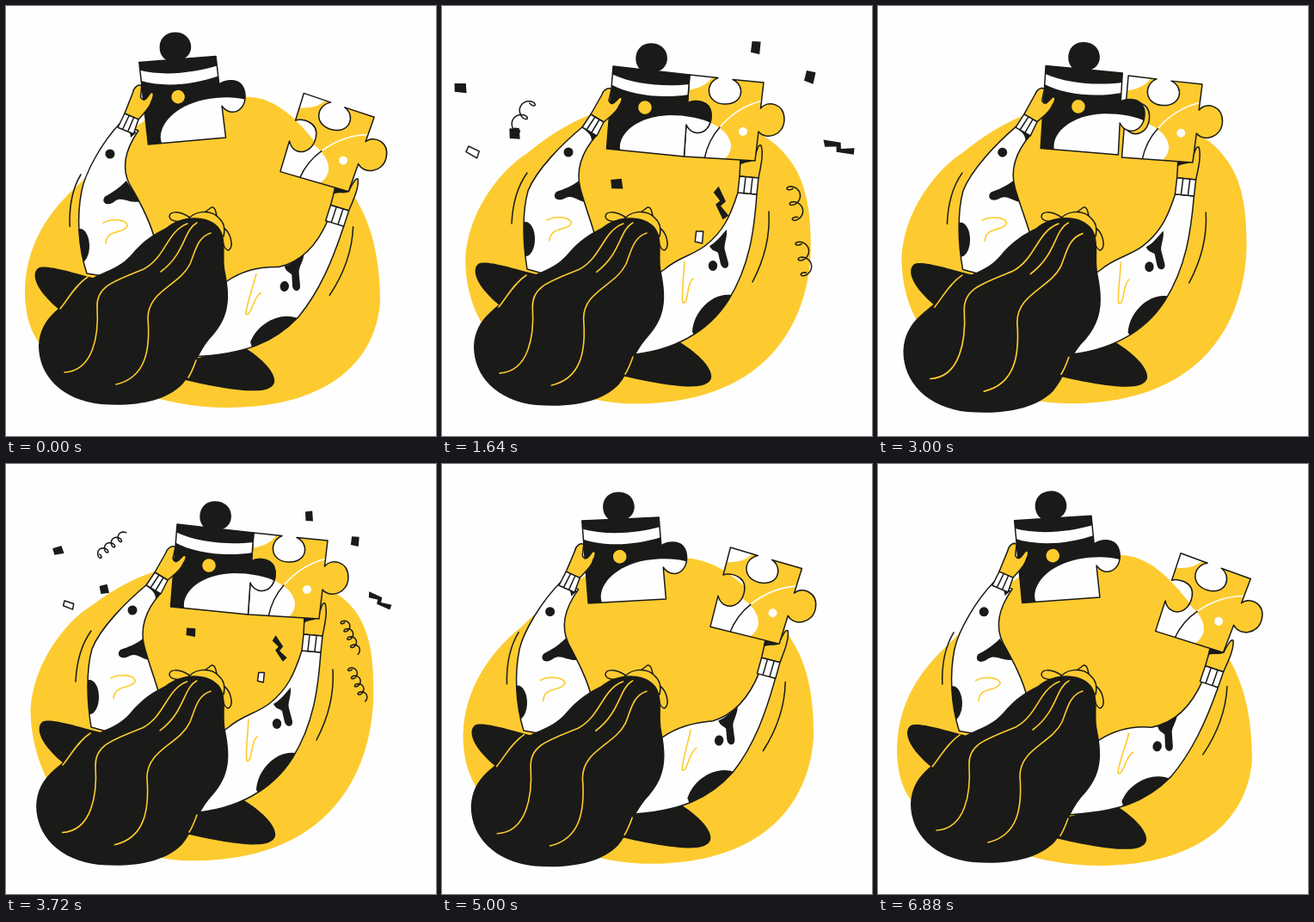
Write an HTML page that moves like this. It is 500x500 px and loops after 6.92 s.

```html
<!DOCTYPE html>
<html lang="en">
<head>
<meta charset="utf-8">
<title>Puzzle</title>
<style>
html, body { margin: 0; width: 100%; height: 100%; overflow: hidden; background: #fefefe; }
svg { display: block; width: 100vw; height: 100vh; }
path { fill: none; stroke-linecap: round; stroke-linejoin: round; }
.ink { fill: #1a1a18; }
.sun { fill: #fdcb2f; }
.paper { fill: #fefefe; }
.line { stroke: #1a1a18; stroke-width: 1.5; }
.glow { stroke: #fdcb2f; stroke-width: 1.6; }
.chalk { stroke: #fefefe; stroke-width: 1.6; }
</style>
</head>
<body>
<svg id="stage" viewBox="0 0 500 500"></svg>
<script>
const LOOP = 6920, CYCLE = LOOP / 3, TAU = 2 * Math.PI;
const NS = 'http://www.w3.org/2000/svg';
const stage = document.getElementById('stage');

function add(parent, tag, attrs = {}) {
  const el = document.createElementNS(NS, tag);
  for (const name in attrs) el.setAttribute(name, attrs[name]);
  return parent.appendChild(el);
}
const group = parent => add(parent, 'g');
const draw = (parent, cls, d) => add(parent, 'path', { class: cls, d });
const dot = (x, y, rx, ry = rx) =>
  `M${x - rx},${y} a${rx},${ry} 0 1,0 ${2 * rx},0 a${rx},${ry} 0 1,0 ${-2 * rx},0Z`;
const lerp = (a, b, k) => a + (b - a) * k;
const smooth = (from, to, t) => {
  const s = Math.min(1, Math.max(0, (t - from) / (to - from)));
  return s * s * (3 - 2 * s);
};

// How far each part is opened: 0 joined, 1 apart, with a sway while apart
const wave = (t, peak, period) => Math.cos(TAU * (t - peak) / period);
const apart = (t, leave) => 1 - smooth(leave, 760, t) + smooth(1750, 2220, t);
function pose(t) {
  const s = t > 1500 ? t - CYCLE : t;
  return {
    left: apart(t, 380) * (1 + .18 * wave(s, 125, 500)),
    right: apart(t, 300) * (1 + .14 * wave(s, 250, 340)),
    blob: (.5 + .5 * wave(t, 0, CYCLE)) ** 1.5
  };
}
const swell = t => 1 + .044 * Math.sin(Math.PI * (t / CYCLE) ** .65) ** 4;

// Blends the numbers of two paths built from the same commands
const NUM = /-?\d+(\.\d+)?/g;
function mix(shut, open, k) {
  const to = open.match(NUM);
  let i = 0;
  return shut.replace(NUM, n => +lerp(+n, +to[i++], k).toFixed(2));
}
const morphs = [], glides = [];
function morph(parent, side, cls, shut, open) {
  morphs.push({ el: draw(parent, cls, shut), side, shut, open });
}
// A rigid part that shifts and turns about a point as its side opens
function glide(parent, side, dx, dy, turn = 0, x = 0, y = 0) {
  const el = group(parent);
  glides.push({ el, side, dx, dy, turn, x, y });
  return el;
}

// Background shape, motion lines, dark shapes behind the body
const back = group(stage);
morph(back, 'blob', 'sun',
  'M29,290 C28,235 70,180 100,163 C120,148 140,137 160,129 C200,115 240,115 285,116 C325,120 350,130 370,143 C390,150 400,160 407,170 C425,195 427,230 427,262 C427,340 390,461 215,461 C150,461 100,430 65,395 C40,360 30,320 29,290Z',
  'M22,330 C24,265 62,228 88,204 C105,186 120,165 140,150 C180,112 235,102 286,106 C320,109 345,140 365,165 C382,186 398,208 409,228 C428,262 435,300 435,345 C430,405 385,467 255,467 C200,467 150,450 100,430 C40,410 22,380 22,330Z');
draw(glide(back, 'left', -12, 2, -5, 99, 194), 'line', 'M99,194 C86,212 82,232 81,253');
draw(glide(back, 'right', 24, 18, 6, 380, 239), 'line', 'M380,239 C382,270 372,300 361,321');
draw(glide(back, 'left', -5, 5), 'ink', 'M110,312 C75,303 50,295 42,300 C33,308 42,328 68,349 L100,350Z');
draw(glide(back, 'right', -1, 5), 'ink', 'M215,407 L275,390 C300,405 315,422 313,433 C308,448 270,444 205,429Z');

// A sleeve outline; returns a group for marks clipped to it
function sleeve(id, side, shut, open) {
  const g = group(stage);
  morph(add(g, 'clipPath', { id }), side, '', shut, open);
  morph(g, side, 'paper', shut, open);
  const marks = add(g, 'g', { 'clip-path': `url(#${id})` });
  morph(g, side, 'line', shut, open);
  return marks;
}

const armL = sleeve('armL', 'left',
  'M164,140 C140,160 110,190 100,215 C93,240 94,275 99,306 L150,320 L190,290 L178,268 C175,255 168,238 161,213 C155,190 162,170 180,150Z',
  'M133,136 C110,160 92,195 88,215 C82,245 84,280 94,311 L150,320 L190,290 L174,275 C168,250 156,228 144,208 C133,187 140,165 154,145Z');
draw(glide(armL, 'left', -26, 2), 'ink', dot(147, 170, 5.5));
draw(glide(armL, 'left', -11, 8), 'ink', dot(97, 271, 11, 20));
draw(glide(armL, 'left', -21, 1, -10, 161, 202), 'ink',
  'M161,202 C150,210 142,213 133,216 C127,222 134,229 144,223 C153,219 158,228 172,229Z');
draw(glide(armL, 'left', -29, -4), 'ink', 'M163,141 L181,151 L174,157 C174,149 169,147 163,141Z');
draw(glide(armL, 'left', -9, 3), 'glow', 'M122,249 C133,243 152,246 150,253 C146,262 126,256 125,273');

const armR = sleeve('armR', 'right',
  'M225,330 L259,306 C275,292 292,290 307,278 C327,262 335,245 344,217 L366,219 C363,260 358,302 333,342 C310,378 270,402 215,406Z',
  'M225,340 L257,320 C275,308 295,303 317,304 C345,298 363,277 375,249 L393,257 C380,296 365,332 340,362 C312,391 280,405 215,408Z');
const drip = glide(armR, 'right', 13, 24, 10, 311, 279);
draw(drip, 'ink',
  'M311,279 C319,275 326,265 331,260 C332,270 327,278 329,284 L333,299 C334,306 326,307 324,300 L321,287 C317,284 314,285 311,279Z');
draw(drip, 'ink', dot(315, 302, 5.2, 6));
draw(glide(armR, 'right', -7, 12, 18, 291, 379), 'ink', 'M291,379 C292,355 315,333 336,336 L345,360 L300,392Z');
draw(glide(armR, 'right', 9, 15, 12, 282, 297), 'glow', 'M282,297 C281,318 278,338 280,345 C287,347 284,322 292,317');

const handR = glide(stage, 'right', 32, 34, 12, 346, 198);
draw(handR, 'sun line', 'M346,198 L347,179 L363,178 C366,168 368,160 371,162 C374,172 371,185 368,200Z');
draw(handR, 'paper line', 'M346,198 L368,200 L366,219 L344,217Z M353,199 L351,217 M361,200 L359,218');
draw(handR, 'ink', 'M346,177 L365,177 C360,183 354,180 346,185Z');

// Confetti bursts outwards from one centre, streamers also fall
const BOLT = 'M-.7,-.5 L.1,-.2 L.05,.1 L.7,.2 L.6,.5 L-.2,.2 L-.15,-.05 L-.7,-.15Z';
const CHIP = 'M-.5,-.42 L.4,-.5 L.5,.5 L-.45,.45Z';
const BURST = [282, 131];
const kinds = {
  chip: { cls: 'ink', d: CHIP, size: 8, at: [[100, 106], [144, 143], [340, 73], [384, 97], [227, 184]] },
  card: { cls: 'paper line', d: CHIP, size: 7, at: [[110, 158], [294, 227]] },
  bolt: { cls: 'ink', d: BOLT, size: 15, at: [[408, 154], [312, 200]] },
  curl: { cls: 'line', at: [[150, 62], [389, 170], [396, 215]] }
};
let seed = 7;
const random = () => (seed = seed * 16807 % 2147483647) / 2147483647;
const party = group(stage);
const bits = Object.values(kinds).flatMap(({ cls, d, size, at }) => at.map(([x, y]) => {
  const el = draw(party, cls, d || '');
  if (d) el.setAttribute('vector-effect', 'non-scaling-stroke');
  return { el, x, y, size, turn: random() * 60 - 30, spin: random() * 80 - 40, thin: .7 + .6 * random() };
}));

function curl(len, u) {
  const turns = 5.5 - 3 * u, amp = 2 + 5 * u;
  let d = '';
  for (let i = 0; i <= 60; i++) {
    const s = i / 60, a = TAU * turns * s;
    const x = len * (s - .5) + amp * .8 * Math.cos(a), y = amp * Math.sin(a);
    d += `${i ? 'L' : 'M'}${x.toFixed(1)},${y.toFixed(1)}`;
  }
  return d;
}

function showParty(t) {
  const on = t > 940 && t < 1890;
  party.setAttribute('visibility', on ? 'visible' : 'hidden');
  if (!on) return;
  const u = (t - 1187) / 453, v = Math.max(0, u), spread = 1 + .43 * u;
  const show = Math.min(1, (t - 930) / 220, (1900 - t) / 130);
  for (const b of bits) {
    const x = lerp(BURST[0], b.x, spread), y = lerp(BURST[1], b.y, spread);
    const grow = b.size * (1 + .6 * v) * show;
    if (b.size) {
      b.el.setAttribute('transform',
        `translate(${x} ${y}) rotate(${b.turn + b.spin * u}) scale(${grow / b.thin} ${grow * b.thin})`);
    } else {
      const onLeft = b.x < BURST[0];
      b.el.setAttribute('d', curl(35 + 10 * v, Math.min(1.2, v)));
      b.el.setAttribute('transform',
        `translate(${x - (onLeft ? 0 : 24 * v)} ${y + (onLeft ? 95 : 42) * v}) ` +
        `rotate(${onLeft ? -17 - 43 * u : 55 + 25 * u}) scale(${show})`);
    }
  }
}

// Puzzle pieces, drawn joined
function piece(id, g, cls, d) {
  draw(add(g, 'clipPath', { id }), '', d);
  draw(g, cls, d);
  const inner = add(g, 'g', { 'clip-path': `url(#${id})` });
  draw(g, 'line', d);
  return inner;
}
const HILL = 'M207,166 C205,150 225,128 265,127 C305,127 334,142 336,162 C336,175 325,185 300,190 L215,185Z';

const right = piece('pieceR', glide(stage, 'right', 38, 18, 13, 282, 175), 'sun',
  'M288,80 L321,83.5 C305,90 307,113 328,114 C351,115 353,92 338,85.5 L374,89 L370.5,119 C378,109 398,113 398,132 C398,150 377,157 368,146 L364,180 L281.5,175 L284,138 C292,155 314,148 313,126 C312,108 291,109 285.5,113Z');
draw(right, 'paper', HILL);
draw(right, 'paper', 'M286,78 L315,82 C308,92 298,96 285,98Z');
draw(right, 'paper', dot(350, 146, 5));
draw(right, 'chalk', 'M373,110 C352,115 335,127 323,141');
draw(right, 'line', 'M323,141 C313,152 308,163 305,178');

const left = piece('pieceL', glide(stage, 'left', -26, -5, -10.8, 192, 166), 'ink',
  'M199,70 L234,74 L235,75 C222,72 222,44 243,44 C264,44 267,70 251,75 L252,76 L288,80 L285.5,113 C291,109 312,108 313,126 C314,148 292,155 284,138 L281.5,175 L191.5,166Z');
draw(left, 'paper', HILL);
draw(left, 'paper', 'M197,79 C225,92 260,94 288,91 L287,103 C255,108 220,104 196,91Z');
draw(left, 'sun', dot(236, 118, 7.8));

const handL = glide(stage, 'left', -35, -1, -8, 173, 126);
draw(handL, 'sun line',
  'M173,126 L186,103 C188,97 194,94 197,97 L194,110 C198,119 203,108 207,106 C211,106 209,112 206,116 C203,124 196,128 188,135Z');
draw(handL, 'paper line', 'M173,126 L188,135 L180,151 L163,141Z M178,129 L168,144 M183,132 L174,147');

// Head and hair
const head = group(stage);
draw(head, 'sun line', 'M214,246 C200,237 190,239 190,245 C191,251 203,252 211,248Z');
draw(head, 'sun line', 'M251,257 C262,262 265,280 259,284 C254,284 252,276 251,268Z');
draw(head, 'sun line', 'M231,240 L239,234 C243,233 244,239 245,244Z');
draw(head, 'sun line', 'M210,252 C216,237 238,236 247,246 C254,252 255,260 253,268 L230,265Z');

const hair = group(stage);
draw(hair, 'ink', 'M186,258 C205,242 235,243 247,257 C258,270 251,290 255,310 C262,345 258,365 236,388 C222,405 218,425 205,440 C185,460 150,466 110,463 C65,458 38,430 38,395 C40,360 65,352 82,333 C100,308 125,312 145,290 C160,272 172,265 186,258Z');
draw(hair, 'glow', 'M211,253 C187,262 186,292 160,306 C125,320 105,326 106,350 C108,382 102,424 68,426');
draw(hair, 'glow', 'M238,264 C222,269 220,286 214,300 C202,325 165,331 165,363 C168,401 162,432 128,440');
draw(hair, 'glow', 'M222,252 C206,261 209,287 180,309');
draw(glide(stage, 'left', -3, 2), 'glow', 'M66,350 C75,339 84,322 98,313');
draw(glide(stage, 'right', -1, 4), 'glow', 'M213,428 C217,422 219,416 222,408');

function render(now) {
  const t = (now % LOOP) % CYCLE, open = pose(t);
  for (const m of morphs) m.el.setAttribute('d', mix(m.shut, m.open, open[m.side]));
  for (const g of glides) {
    const k = open[g.side];
    g.el.setAttribute('transform', `translate(${g.dx * k} ${g.dy * k}) rotate(${g.turn * k} ${g.x} ${g.y})`);
  }
  hair.setAttribute('transform', `translate(240 250) scale(${swell(t)}) translate(-240 -250)`);
  showParty(t);
}

const start = performance.now();
function tick() {
  render(performance.now() - start);
  requestAnimationFrame(tick);
}
tick();
</script>
</body>
</html>
```
